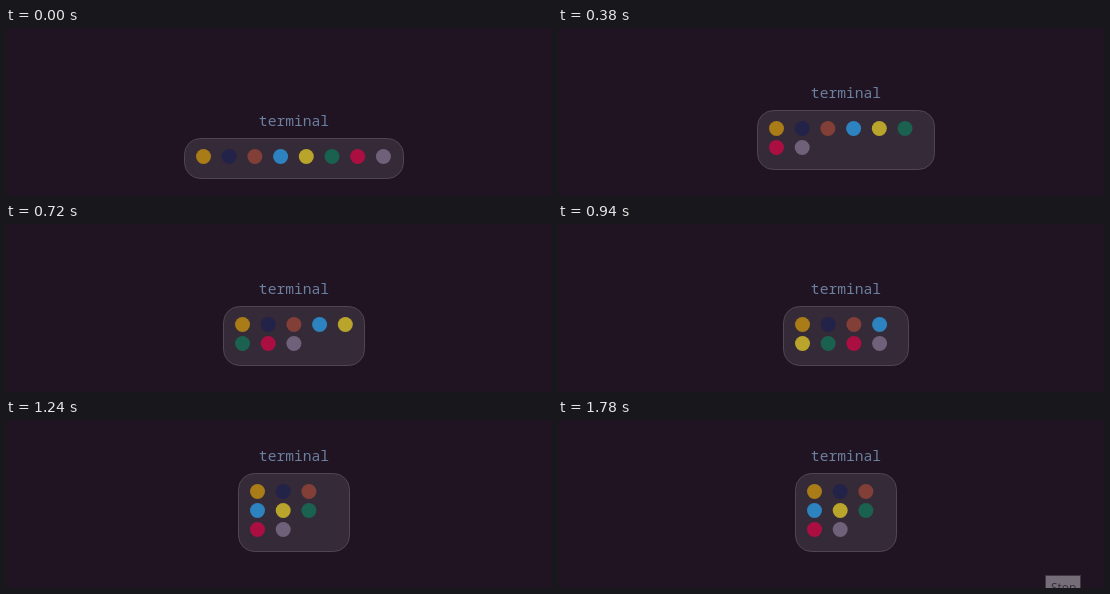
Recreate the animation shown at these times as an HTML page. Size 546 by 168 pixels, loop 1.8 s.

```html
<!DOCTYPE html>
<html lang="en">
<head>
<meta charset="utf-8">
<title>Wrapping palette</title>
<style>
  html, body { margin: 0; width: 100%; height: 100%; overflow: hidden; background: #201423; }
  svg { display: block; }
  #label { font: 14.65px "Noto Sans Mono", "DejaVu Sans Mono", monospace; fill: #6c7f9f; text-anchor: middle; }
  #panel { fill: #352a37; stroke: #50464f; }
  #tip rect { fill: #fff; stroke: #767676; }
  #tip text { font: 12px "Open Sans", "Noto Sans", sans-serif; fill: #575757; }
</style>
</head>
<body>
<svg width="546" height="168" viewBox="0 0 546 168">
  <text id="label" x="288"></text>
  <rect id="panel" rx="16"/>
  <g id="dots"></g>
  <g id="tip">
    <rect x="487.5" y="155.5" width="35" height="18"/>
    <text x="493" y="172">Stop</text>
  </g>
</svg>
<script>
const LOOP = 1800, STEP = 20, CENTER = 288;
const PITCH_X = 25.7, PITCH_Y = 19, PAD = 12, DOT = 15;
const colors = ['#a97c18', '#232248', '#823f37', '#2d83bf', '#b9a52b', '#1b6150', '#ab0f42', '#6f6179'];

// Panel width over time: [ms, px]
const widths = [[0, 220], [240, 196], [520, 160], [940, 126], [1240, 112], [1440, 108], [1780, 102]];

const $ = id => document.getElementById(id);
const label = $('label'), panel = $('panel'), tip = $('tip');
label.textContent = 'terminal';

function set(el, attrs) {
  for (const key in attrs) el.setAttribute(key, attrs[key]);
}

const dots = colors.map(fill => {
  const dot = document.createElementNS('http://www.w3.org/2000/svg', 'circle');
  set(dot, { r: DOT / 2, fill });
  return $('dots').appendChild(dot);
});

const clamp = v => Math.max(0, Math.min(1, v));

function slope(i) {
  const a = widths[Math.max(0, i - 1)], b = widths[Math.min(widths.length - 1, i + 1)];
  return (b[1] - a[1]) / (b[0] - a[0]);
}

// Smooth Hermite curve through the width points
function widthAt(t) {
  let i = 0;
  while (i < widths.length - 2 && t > widths[i + 1][0]) i++;
  const [t0, w0] = widths[i], [t1, w1] = widths[i + 1];
  const d = t1 - t0, u = clamp((t - t0) / d), v = 1 - u;
  return w0 * v * v * (1 + 2 * u) + w1 * u * u * (3 - 2 * u)
    + d * u * v * (slope(i) * v - slope(i + 1) * u);
}

function draw(t) {
  const w = widthAt(t);
  const left = Math.round(CENTER - w / 2), right = 2 * CENTER - left;
  const cols = Math.floor((w - 2 * PAD - DOT) / PITCH_X) + 1;
  const rows = Math.ceil(colors.length / cols);
  const top = Math.floor(139 - 28.5 * rows);

  set(label, { y: top - 12 });
  set(panel, { x: left + 0.5, y: top + 0.5, width: right - left - 1, height: 21 + PITCH_Y * rows });
  dots.forEach((dot, i) => set(dot, {
    cx: left + PAD + DOT / 2 + (i % cols) * PITCH_X,
    cy: top + 18.5 + Math.floor(i / cols) * PITCH_Y
  }));
  set(tip, { opacity: t < 1600 ? clamp((t - 1320) / 100) : clamp(1 - (t - 1600) / 290) });
}

const start = performance.now();
function tick() {
  const t = (performance.now() - start) % LOOP;
  draw(Math.floor(t / STEP) * STEP);
  requestAnimationFrame(tick);
}
tick();
</script>
</body>
</html>
```
